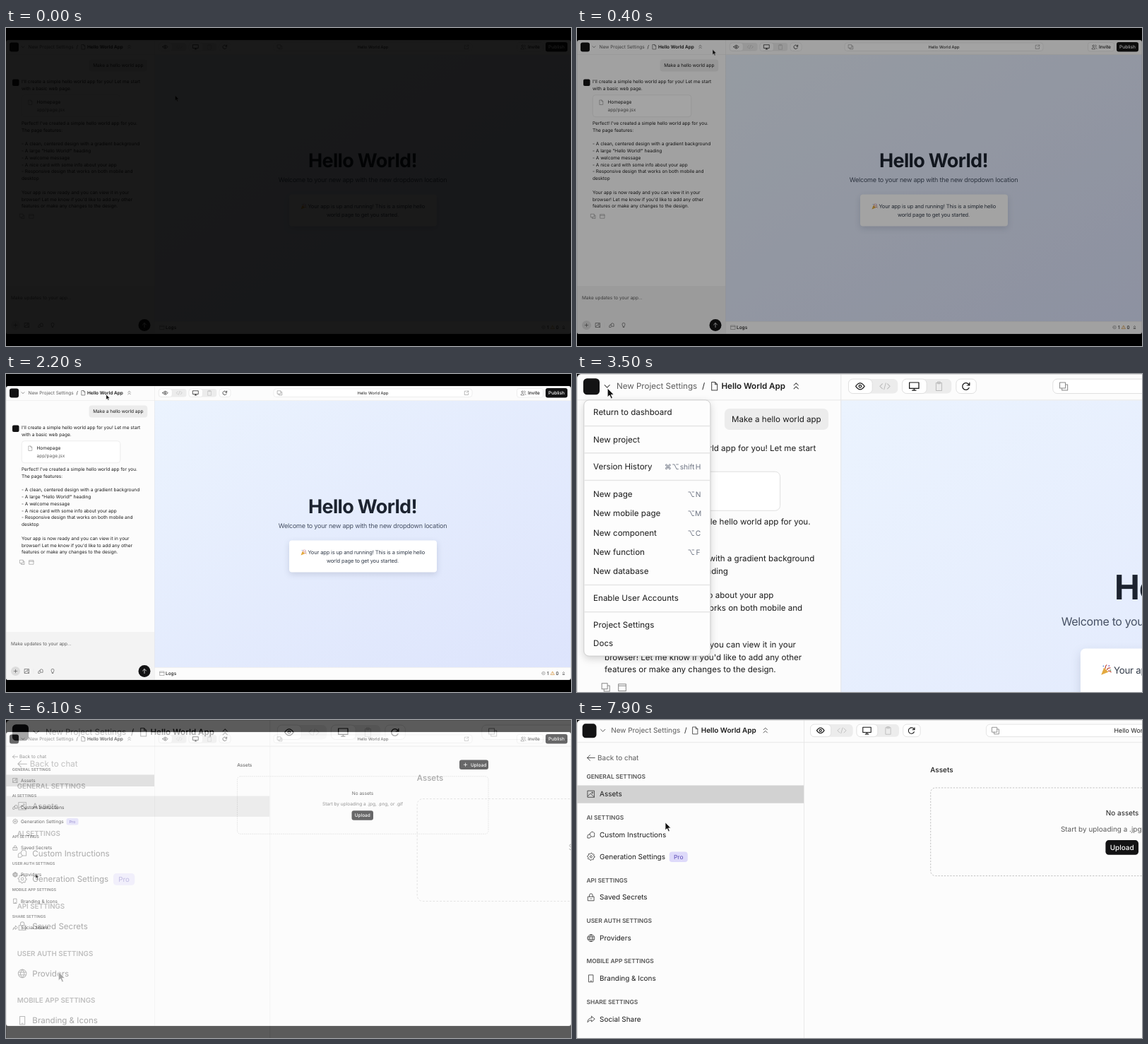
An HTML page that plays this animation: 800 by 450 pixels, repeating every 8 s.

```html
<!DOCTYPE html>
<html lang="en">
<head>
<meta charset="utf-8">
<title>App builder walkthrough</title>
<style>
  html, body { margin: 0; width: 100%; height: 100%; overflow: hidden; background: #000; }
  svg { display: block; width: 800px; height: 450px; }
  text { font: 400 13px Inter, "DejaVu Sans", sans-serif; fill: #1b1b1b; text-rendering: geometricPrecision; white-space: pre; }
  .gray { fill: #5c5c5c; }
  .white { fill: #fff; }
  .medium { font-weight: 500; }
  .bold { font-weight: 600; }
  .mid { text-anchor: middle; }
  .url { font-size: 11.5px; }
  .key { font-size: 11.5px; fill: #6b7280; }
  .section { font-size: 11px; font-weight: 600; fill: #555; }
  .pro { font-size: 11px; fill: #5b4bb5; }
  .title { font-size: 54px; font-weight: 700; letter-spacing: -.025em; fill: #1c232f; }
  .lead { font-size: 18px; letter-spacing: -.022em; fill: #465063; }
  .note { font-size: 15px; letter-spacing: -.02em; fill: #333c4a; }
  .icon { fill: none; stroke: #444; stroke-width: 1.15; stroke-linecap: round; stroke-linejoin: round; }
  .pale { stroke: #bcbcbc; }
  .soft { stroke: #888; }
  .light { stroke: #fff; stroke-width: 1.5; }
  .dark { stroke: #151515; stroke-width: 1.4; }
  .amber { stroke: #d08a2c; }
  .page { fill: #fcfcfc; }
  .black { fill: #131314; }
  .tray { fill: #ececec; }
  .tile { fill: #fff; stroke: #dcdcdc; }
  .line { fill: #e4e4e4; }
  .panel { fill: #fdfdfd; stroke: #c9c9c9; filter: drop-shadow(0 4px 6px rgba(0,0,0,.16)); }
  .card { fill: #fff; filter: drop-shadow(0 6px 8px rgba(20,30,60,.14)); }
  .dashed { fill: none; stroke: #b0b0b0; stroke-dasharray: 3 2.5; }
</style>
</head>
<body>
<svg viewBox="0 0 800 450">
  <defs>
    <linearGradient id="sky" x1="0" y1="0" x2="1" y2="1">
      <stop offset="0" stop-color="#ebf3fe"/>
      <stop offset="1" stop-color="#dde4fc"/>
    </linearGradient>
    <clipPath id="frame"><rect width="1600" height="832" rx="7"/></clipPath>
  </defs>
  <g id="camera">
    <g id="app" clip-path="url(#frame)">
      <rect class="page" width="1600" height="832"/>
      <g id="chat"></g>
      <g id="settings"></g>
      <g id="header"></g>
      <g id="menu"></g>
      <rect x=".5" y=".5" width="1599" height="831" rx="7" fill="none" stroke="#d4d4d4"/>
      <path id="cursor" d="M0 0V14.5L3.4 11.4 5.8 16.8 8.2 15.8 5.9 10.5H10.4Z" fill="#111" stroke="#fff"/>
    </g>
  </g>
  <g id="dissolve">
    <rect width="800" height="450"/>
    <use href="#app" transform="translate(0 17) scale(.5)"/>
  </g>
</svg>
<script>
const $ = id => document.getElementById(id);

// Markup helpers; y is the middle of a text line or icon.
const text = (x, y, str, cls = '') => `<text x="${x}" y="${y + 4.6}" class="${cls}">${str}</text>`;
const box = (x, y, w, h, r, cls) => `<rect x="${x}" y="${y}" width="${w}" height="${h}" rx="${r}" class="${cls}"/>`;
const dot = (x, y, r, fill) => `<circle cx="${x}" cy="${y}" r="${r}" fill="${fill}"/>`;
const ring = (x, y, r) => `M${x - r} ${y}a${r} ${r} 0 1 0 ${2 * r} 0a${r} ${r} 0 1 0 ${-2 * r} 0`;
const gear = () => 'M' + Array.from({ length: 32 }, (_, i) => {
  const a = i * Math.PI / 16, r = i % 4 < 2 ? 6.8 : 5.3;
  return (r * Math.cos(a)).toFixed(1) + ' ' + (r * Math.sin(a)).toFixed(1);
}).join('L') + 'Z';

const shapes = {
  doc: 'M-4.5-6.5H1L4.5-3V6.5H-4.5ZM1-6.5V-3H4.5',
  down: 'M-4-2L0 2 4-2',
  up2: 'M-3.5-1L0-4.5 3.5-1M-3.5 4.5L0 1 3.5 4.5',
  updown: 'M-2.5-1.5L0-4 2.5-1.5M-2.5 1.5H2.5M-2.5 4H2.5',
  eye: 'M-7 0Q0-10 7 0Q0 10-7 0Z' + ring(0, 0, 2),
  code: 'M-4-4L-8 0-4 4M4-4L8 0 4 4M1.5-5L-1.5 5',
  screen: 'M-7.5-6H7.5V3.5H-7.5ZM-3 6.5H3M0 3.5V6.5',
  clip: 'M-4.5-5.5H4.5V7H-4.5ZM-2-7H2V-4H-2Z',
  reload: 'M5.2-1.5A5.5 5.5 0 1 0 5 2.5M5.8-5.5V-1.5H1.8',
  copy: 'M-6-6H3V3H-6ZM3-2.5H6.5V6.5H-2.5V3',
  open: 'M-1-5H-5.5V5.5H5V1M1.5-5.5H5.5V-1.5M5.5-5.5L0 0',
  people: 'M-7 5.5C-7 0 2 0 2 5.5ZM3-5.5a2.5 2.5 0 0 1 0 5M4.5 1.5Q7 3 7 5.5' + ring(-2.5, -3, 2.5),
  pane: 'M-6-5H6V6H-6ZM-6-2H6',
  plus: 'M-4.5 0H4.5M0-4.5V4.5',
  image: 'M-6-6H6V6H-6ZM-6 4L-1-1 6 5.5' + ring(2.5, -2.5, 1.2),
  talk: 'M-2-1.5A4.2 4.2 0 1 1 6.2 0V3.5H2A4.2 4.2 0 0 1-2-1.5M-3-1A3.5 3.5 0 0 0-6.5 2.5V6H-2.5L0 4',
  bulb: 'M-2 3.5C-2 1.5-4 .5-4-2.5a4 4 0 1 1 8 0C4 .5 2 1.5 2 3.5ZM-1.5 6H1.5',
  send: 'M0 6V-6M-5-1L0-6 5-1',
  error: ring(0, 0, 4.5) + 'M-1.5-1.5L1.5 1.5M1.5-1.5L-1.5 1.5',
  warn: 'M0-4.5L5 4H-5ZM0-1.5V1',
  back: 'M7 0H-7M-2-5L-7 0-2 5',
  gear: gear() + ring(0, 0, 2),
  lock: 'M-5.5-1H5.5V6.5H-5.5ZM-3-1V-3.5a3 3 0 0 1 6 0V-1M0 2V3.5',
  globe: ring(0, 0, 6.5) + 'M0-6.5Q-6 0 0 6.5Q6 0 0-6.5M-6-2.2H6M-6 2.2H6',
  phone: 'M-4-6.5H4V6.5H-4ZM-1 4.5H1',
  share: 'M1-5.5L7-.5 1 4.5V1.5Q-4 1.5-6.5 5.5Q-6-2 1-2.5Z'
};
const icon = (name, x, y, cls = '') => `<path class="icon ${cls}" transform="translate(${x} ${y})" d="${shapes[name]}"/>`;

$('header').innerHTML =
  box(0, 41, 1600, 1, 0, 'line') + box(420, 0, 1, 832, 0, 'line') +
  box(10, 7, 26, 26, 6, 'black') + icon('down', 48, 19.5) +
  text(63, 19, 'New Project Settings', 'gray') + text(199, 19, '/') +
  icon('doc', 219, 19.5) + text(230, 19, 'Hello World App', 'bold') + icon('up2', 349, 19) +
  box(432, 8, 79, 23, 7, 'tray') + box(432.5, 8, 38, 23, 7, 'tile') +
  icon('eye', 451, 19.5, 'dark') + icon('code', 490.5, 19.5, 'pale') +
  box(517.5, 8, 79, 23, 7, 'tray') + box(518, 8, 39, 23, 7, 'tile') +
  icon('screen', 537, 19.5, 'dark') + icon('clip', 576.5, 19.5, 'pale') +
  box(604, 8, 32, 23, 7, 'tile') + icon('reload', 619.5, 19.5, 'dark') +
  box(758, 8, 562, 23, 7, 'tile') + icon('copy', 775, 19.5, 'soft') +
  text(1039, 19, 'Hello World App', 'url mid') + icon('open', 1304, 19.5, 'soft') +
  box(1447, 7, 74, 25, 6, 'tile') + icon('people', 1465, 19.5) + text(1478, 19.5, 'Invite', 'medium') +
  box(1528, 6, 62, 27, 6, 'black') + text(1559, 19.5, 'Publish', 'white medium mid');

const reply = [
  "Perfect! I've created a simple hello world app for you.", 'The page features:', '',
  '- A clean, centered design with a gradient background', '- A large "Hello World!" heading',
  '- A welcome message', '- A nice card with some info about your app',
  '- Responsive design that works on both mobile and', 'desktop', '',
  'Your app is now ready and you can view it in your',
  "browser! Let me know if you'd like to add any other", 'features or make any changes to the design.'
];
const popper = `<g transform="translate(835 463)"><path d="M0 16L4.5 4.5 11.5 11.5Z" fill="#e3a93f"/>
  <path d="M7 6Q6 2 9 0M9 8Q11 4 15 5M11 10Q14 9 16 12" fill="none" stroke="#c2503f" stroke-width="1.4"/>` +
  dot(3.5, 2, 1, '#4a86d0') + dot(12.5, 1.5, 1.1, '#8b5cc0') + dot(15, 8.5, .9, '#4a9a5a') + '</g>';

$('chat').innerHTML =
  box(235, 55, 165.5, 34, 8, 'tray') + text(246.5, 72, 'Make a hello world app') +
  box(18, 111, 19, 19, 4, 'black') +
  text(44, 117.5, "I'll create a simple hello world app for you! Let me start") +
  text(44, 137, 'with a basic web page.') +
  box(44.5, 155.5, 279, 62, 8, 'tile') + icon('doc', 69, 176.5, 'soft') +
  text(87, 176, 'Homepage') + text(87, 197, 'app/page.jsx', 'gray') +
  reply.map((line, i) => text(44, 235 + i * 19.6, line)).join('') +
  icon('copy', 45.5, 498.5, 'soft') + icon('pane', 72, 498.5, 'soft') +
  '<rect y="696" width="420" height="136" fill="#f3f3f3"/>' +
  text(14, 730, 'Make updates to your app...', 'gray') +
  dot(27, 807, 13, '#dcdcdc') + icon('plus', 27, 807) + icon('image', 59, 807) +
  box(77.5, 800, 1, 14, 0, 'line') + icon('talk', 98, 807) + icon('bulb', 132, 807) +
  dot(392, 807, 17, '#131314') + icon('send', 392, 807, 'light') +
  '<rect x="420" y="42" width="1180" height="754" fill="url(#sky)"/>' +
  text(1010, 354.4, 'Hello World!', 'title mid') +
  text(1010, 396.4, 'Welcome to your new app with the new dropdown location', 'lead mid') +
  box(802, 437, 418, 90, 8, 'card') + popper +
  text(855, 472.2, 'Your app is up and running! This is a simple hello', 'note') +
  text(1010, 494.6, 'world page to get you started.', 'note mid') +
  box(420, 796, 1180, 1, 0, 'line') + icon('pane', 442, 813, 'soft') + text(452, 813, 'Logs', 'medium') +
  icon('error', 1522, 813, 'soft') + text(1532, 813, '1') +
  icon('warn', 1548, 813, 'amber') + text(1557, 813, '0') + icon('updown', 1579, 813);

const sections = [[105, 'GENERAL'], [180, 'AI'], [296.5, 'API'], [371.7, 'USER AUTH'], [446.5, 'MOBILE APP'], [521.5, 'SHARE']];
const entries = [
  [137, 'image', 'Assets'], [212.5, 'talk', 'Custom Instructions'], [253, 'gear', 'Generation Settings'],
  [328, 'lock', 'Saved Secrets'], [403.7, 'globe', 'Providers'], [478.5, 'phone', 'Branding &amp; Icons'],
  [554, 'share', 'Social Share']
];
$('settings').innerHTML =
  icon('back', 26, 70) + text(38, 70, 'Back to chat', 'gray') +
  '<rect y="121" width="420" height="33" fill="#d2d2d2"/>' +
  sections.map(([y, name]) => text(17.6, y - .6, name + ' SETTINGS', 'section')).join('') +
  entries.map(([y, glyph, name]) => icon(glyph, 26, y) + text(42, y, name)).join('') +
  '<rect x="171" y="244" width="34" height="19" rx="5" fill="#dedafa"/>' + text(188, 253, 'Pro', 'pro mid') +
  text(654.5, 92.5, 'Assets', 'medium') +
  box(1284, 79, 82, 27, 6, 'black') + icon('plus', 1301, 92.5, 'light') + text(1316, 92.5, 'Upload', 'white medium') +
  box(655, 125.5, 711, 163, 9, 'dashed') +
  text(1010, 172.5, 'No assets', 'mid') +
  text(1010, 202.5, 'Start by uploading a .jpg, .png, or .gif', 'gray mid') +
  box(979, 222.5, 61, 27, 6, 'black') + text(1009.5, 236, 'Upload', 'white medium mid');

const items = [
  [61, 'Return to dashboard'], [104, 'New project'], [147, 'Version History', 'H'],
  [191, 'New page', 'N'], [222, 'New mobile page', 'M'], [253, 'New component', 'C'],
  [283.5, 'New function', 'F'], [314, 'New database'], [356.6, 'Enable User Accounts'],
  [399, 'Project Settings'], [428.6, 'Docs']
];
const shortcut = (y, key) => key
  ? text(193, y, key, 'key mid') + (key === 'H'
    ? text(145, y, '⌘', 'key mid') + text(157, y, '⌥', 'key mid') + text(175.5, y, 'shift', 'key mid')
    : text(182, y, '⌥', 'key mid'))
  : '';
$('menu').innerHTML =
  box(11, 41.5, 201.5, 407.5, 8, 'panel') +
  '<rect id="hover" x="11.5" width="200.5" height="29.5" fill="#ebebeb"/>' +
  [82, 125, 168.5, 335, 378].map(y => box(11.5, y, 200.5, 1.6, 0, 'line')).join('') +
  items.map(([y, name, key]) => text(26, y, name) + shortcut(y, key)).join('');

// Keys are [ms, ...values].
const smooth = p => p * p * (3 - 2 * p);
function track(keys, t, ease = p => p) {
  const i = keys.findIndex(k => k[0] > t);
  if (i < 1) return keys.at(i).slice(1);
  const a = keys[i - 1], b = keys[i], p = ease((t - a[0]) / (b[0] - a[0]));
  return a.slice(1).map((v, j) => v + (b[j + 1] - v) * p);
}
const fade = [[0, .1], [400, .64], [800, .93], [1000, 1]];
const zoom = [[0, 0], [3230, 0], [3480, 1], [6210, 1], [6210, 0], [7730, 0], [7980, 1]];
const blend = [[0, 0], [5910, 0], [6210, 1]];
const pointer = [
  [0, 479, 157], [400, 384, 27], [800, 389, 20.5], [1900, 388, 23], [2700, 58, 26], [3000, 48.5, 22.5],
  [4200, 48.5, 22.5], [4900, 83.5, 400.5], [6500, 83.5, 400.5], [7700, 163.5, 189.5]
];
const show = (id, on) => $(id).setAttribute('display', on ? 'inline' : 'none');

function draw() {
  // The picture holds for 100 ms at a time.
  const t = Math.floor((performance.now() + 5) % 8000 / 100) * 100;
  const scale = 1 + track(zoom, t)[0] * 7 / 9;
  const top = Math.max(0, 225 - 208 * scale);
  const [x, y] = track(pointer, t, smooth);
  const mix = track(blend, t)[0];
  const inSettings = t >= 5300;

  $('camera').setAttribute('transform', `translate(0 ${top}) scale(${scale / 2})`);
  $('camera').setAttribute('opacity', track(fade, t)[0]);
  $('cursor').setAttribute('transform', `translate(${x} ${y})`);
  show('chat', !inSettings);
  show('settings', inSettings);
  show('menu', t >= 3400 && !inSettings);
  show('dissolve', mix > 0 && mix < 1);
  $('dissolve').setAttribute('opacity', mix);

  const row = items.find(item => Math.abs(item[0] - y) < 15);
  show('hover', row);
  if (row) $('hover').setAttribute('y', row[0] - 14.75);
  requestAnimationFrame(draw);
}
draw();
</script>
</body>
</html>
```
